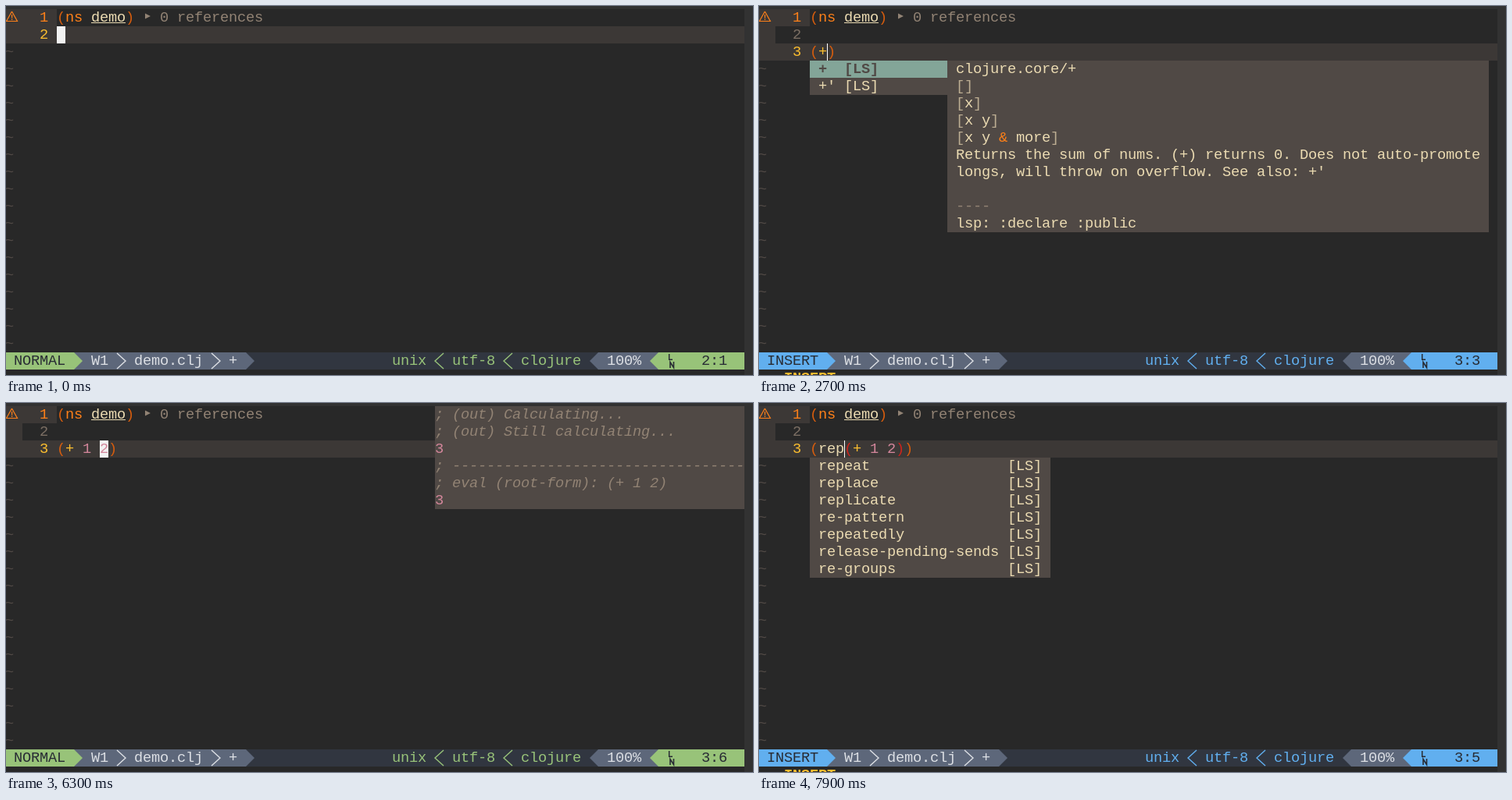
Recreate the animation shown at these times as an HTML page with a canvas. Size 956 by 473 pixels, loop 8000 ms.

```html
<!DOCTYPE html>
<html lang="en">
<head>
<meta charset="utf-8">
<title>Editor demo</title>
<style>
html, body { margin: 0; width: 100%; height: 100%; overflow: hidden; background: #323232; }
canvas { display: block; }
</style>
</head>
<body>
<canvas id="stage" width="956" height="473"></canvas>
<script>
const ctx = document.getElementById('stage').getContext('2d');
const LOOP = 8000, CW = 11, CH = 22, COLS = 86, STATUS = 20;
const C = {
  pad: '#323232', bg: '#282828', line: '#3c3836', float: '#504945', match: '#665c54',
  fg: '#ebdbb2', tan: '#bdae93', gray: '#928374', num: '#7c6f64', orange: '#fe8019',
  yellow: '#fabd2f', pink: '#d3869b', teal: '#83a598', cursor: '#f2f2f2',
  green: '#98c379', blue: '#61afef', ink: '#282c34', mid: '#5d677a', dark: '#313640', white: '#dcdfe4'
};
const RAINBOW = ['#d65d0e', '#cc241d'];

// Each step changes part of the editor state at time t.
const STEPS = [
  { t: 0, mode: 'NORMAL', row: 1, col: 0, code: '', menu: '', hud: 0 },
  { t: 500, mode: 'INSERT' },
  { t: 1200, row: 2 },
  { t: 1600, code: '()', col: 1 },
  { t: 2100, code: '(+)', col: 2 },
  { t: 2200, menu: 'plus' },
  { t: 2700, menu: 'docs' },
  { t: 3600, code: '(+ )', col: 3, menu: '' },
  { t: 3900, code: '(+ 1)', col: 4 },
  { t: 4000, code: '(+ 1 )', col: 5 },
  { t: 4100, code: '(+ 1 2)', col: 6 },
  { t: 4900, mode: 'NORMAL', col: 5 },
  { t: 5200, hud: 5 },
  { t: 5300, hud: 6 },
  { t: 6800, col: 0 },
  { t: 7000, mode: 'INSERT' },
  { t: 7200, code: '((+ 1 2))', col: 1 },
  { t: 7400, code: '(r(+ 1 2))', col: 2 },
  { t: 7500, code: '(re(+ 1 2))', col: 3 },
  { t: 7600, code: '(rep(+ 1 2))', col: 4, hud: 0 },
  { t: 7700, menu: 'rep' }
];

const HUD = [
  '; (out) Calculating...',
  '; (out) Still calculating...',
  '3',
  '; ' + '-'.repeat(34),
  '; eval (root-form): (+ 1 2)',
  '3'
];
const DOCS = [
  'clojure.core/+', '[]', '[x]', '[x y]', '[x y & more]',
  'Returns the sum of nums. (+) returns 0. Does not auto-promote',
  "longs, will throw on overflow. See also: +'",
  '', '----', 'lsp: :declare :public'
];
const WORDS = ['repeat', 'replace', 'replicate', 're-pattern', 'repeatedly',
  'release-pending-sends', 're-groups'];

const X = col => col * CW - 1;
const Y = row => 4 + row * CH;

function box(col, row, cols, rows, color) {
  ctx.fillStyle = color;
  ctx.fillRect(X(col), Y(row), cols * CW, rows * CH);
}

function put(col, row, text, color, style = '') {
  ctx.font = style + " 18.667px 'Liberation Mono', monospace";
  [...text].forEach((ch, i) => {
    if (ch === ' ') return;
    ctx.fillStyle = typeof color === 'function' ? color(ch, i) : color;
    ctx.fillText(ch, X(col + i), Y(row) + 16);
  });
}

function path(points, color, width) {
  ctx.beginPath();
  points.forEach(([x, y]) => ctx.lineTo(x, y));
  if (width) {
    ctx.strokeStyle = color;
    ctx.lineWidth = width;
    ctx.stroke();
  } else {
    ctx.fillStyle = color;
    ctx.fill();
  }
}

// Powerline separator: solid arrow or thin chevron, pointing right (1) or left (-1).
function separator(col, dir, color, width) {
  const base = X(dir > 0 ? col : col + 1), y = Y(STATUS), inset = width ? 1 : 0;
  path([[base, y + inset], [base + dir * CW, y + 11], [base, y + CH - inset]], color, width);
}

function matchPair(code, col) {
  const dir = { '(': 1, ')': -1 }[code[col]];
  if (!dir) return [];
  let depth = 0;
  for (let i = col; i >= 0 && i < code.length; i += dir) {
    depth += (code[i] === '(') - (code[i] === ')');
    if (!depth) return [col, i];
  }
  return [];
}

function drawCode(s) {
  if (!s.menu) matchPair(s.code, s.col).forEach(i => box(6 + i, 2, 1, 1, C.match));
  if (s.mode === 'NORMAL') box(6 + s.col, s.row, 1, 1, C.cursor);
  let depth = 0;
  put(6, 2, s.code, ch => {
    if (ch === '(') return RAINBOW[depth++];
    if (ch === ')') return RAINBOW[--depth];
    if (ch === '+') return C.yellow;
    return /\d/.test(ch) ? C.pink : C.fg;
  });
  if (s.mode === 'INSERT') {
    ctx.fillStyle = '#fff';
    ctx.fillRect(X(6 + s.col), Y(s.row), 1, CH);
  }
}

function drawBuffer(s) {
  box(0, 0, 2, s.row + 1, C.line);
  box(0, 0, 6, 1, C.line);
  box(0, s.row, COLS, 1, C.line);

  path([[7.5, 7], [14.5, 19.5], [0.5, 19.5], [7.5, 7]], C.orange, 1.2);
  ctx.fillStyle = C.orange;
  ctx.fillRect(7, 11, 1.2, 4.5);
  ctx.fillRect(7, 16.5, 1.2, 1.5);

  for (let r = 0; r <= s.row; r++) {
    put(4, r, String(r + 1), r === s.row ? C.yellow : r ? C.num : C.orange);
  }
  for (let r = s.row + 1; r < STATUS; r++) put(0, r, '~', C.float);

  put(6, 0, '(', RAINBOW[0]);
  put(7, 0, 'ns', C.orange);
  put(10, 0, 'demo', C.fg);
  ctx.fillStyle = C.fg;
  ctx.fillRect(X(10), 21, 4 * CW, 1);
  put(14, 0, ')', RAINBOW[0]);
  path([[178, 9.5], [185, 13], [178, 16.5]], C.gray);
  put(18, 0, '0 references', C.gray);
  drawCode(s);
}

function drawMenu(menu) {
  if (menu === 'rep') {
    box(6, 3, 28, WORDS.length, C.float);
    WORDS.forEach((word, i) => put(7, 3 + i, word.padEnd(22) + '[LS]', C.fg));
    return;
  }
  const docs = menu === 'docs';
  box(6, 3, 16, 2, C.float);
  if (docs) box(6, 3, 16, 1, C.teal);
  put(7, 3, '+  [LS]', docs ? C.float : C.fg, docs ? 'bold' : '');
  put(7, 4, "+' [LS]", C.fg);
  if (!docs) return;
  box(22, 3, 63, DOCS.length, C.float);
  DOCS.forEach((text, i) => put(23, 3 + i, text, ch =>
    ch === '&' ? C.orange : /[[\]]/.test(ch) ? C.tan : text === '----' ? C.gray : C.fg));
}

function drawHud(rows) {
  box(50, 0, 36, rows, C.float);
  HUD.slice(0, rows).forEach((text, i) => {
    const comment = text[0] === ';';
    put(50, i, text, comment ? C.gray : C.pink, comment ? 'italic' : '');
  });
}

function drawStatus(s) {
  const accent = s.mode === 'INSERT' ? C.blue : C.green;
  box(0, STATUS, COLS, 1, C.dark);
  box(0, STATUS, 28, 1, C.mid);
  box(0, STATUS, 8, 1, accent);
  box(69, STATUS, 7, 1, C.mid);
  box(76, STATUS, 10, 1, accent);

  separator(8, 1, accent);
  separator(28, 1, C.mid);
  separator(68, -1, C.mid);
  separator(75, -1, accent);
  [13, 24].forEach(col => separator(col, 1, C.white, 1.4));
  [50, 58].forEach(col => separator(col, -1, accent, 1.4));

  put(1, STATUS, s.mode, C.ink);
  put(10, STATUS, 'W1', C.white);
  put(15, STATUS, 'demo.clj', C.white);
  put(26, STATUS, '+', C.white);
  put(45, STATUS, 'unix', accent);
  put(52, STATUS, 'utf-8', accent);
  put(60, STATUS, 'clojure', accent);
  put(70, STATUS, '100%', C.white);
  put(81, STATUS, `${s.row + 1}:${s.col + 1}`, C.ink);
  path([[848.7, 446], [848.7, 453.3], [853, 453.3]], C.ink, 1.5);
  path([[850, 464], [850, 456.5], [854.5, 463.5], [854.5, 456]], C.ink, 1.6);

  if (s.mode === 'INSERT') put(0, STATUS + 1, '-- INSERT --', C.yellow, 'bold');
}

function draw(t) {
  const s = Object.assign({}, ...STEPS.filter(step => step.t <= t));
  ctx.fillStyle = C.pad;
  ctx.fillRect(0, 0, 956, 473);
  box(0, 0, COLS, 22, C.bg);
  drawBuffer(s);
  if (s.hud) drawHud(s.hud);
  if (s.menu) drawMenu(s.menu);
  drawStatus(s);
}

const start = performance.now();
function tick() {
  draw((performance.now() - start) % LOOP);
  requestAnimationFrame(tick);
}
tick();
</script>
</body>
</html>
```
